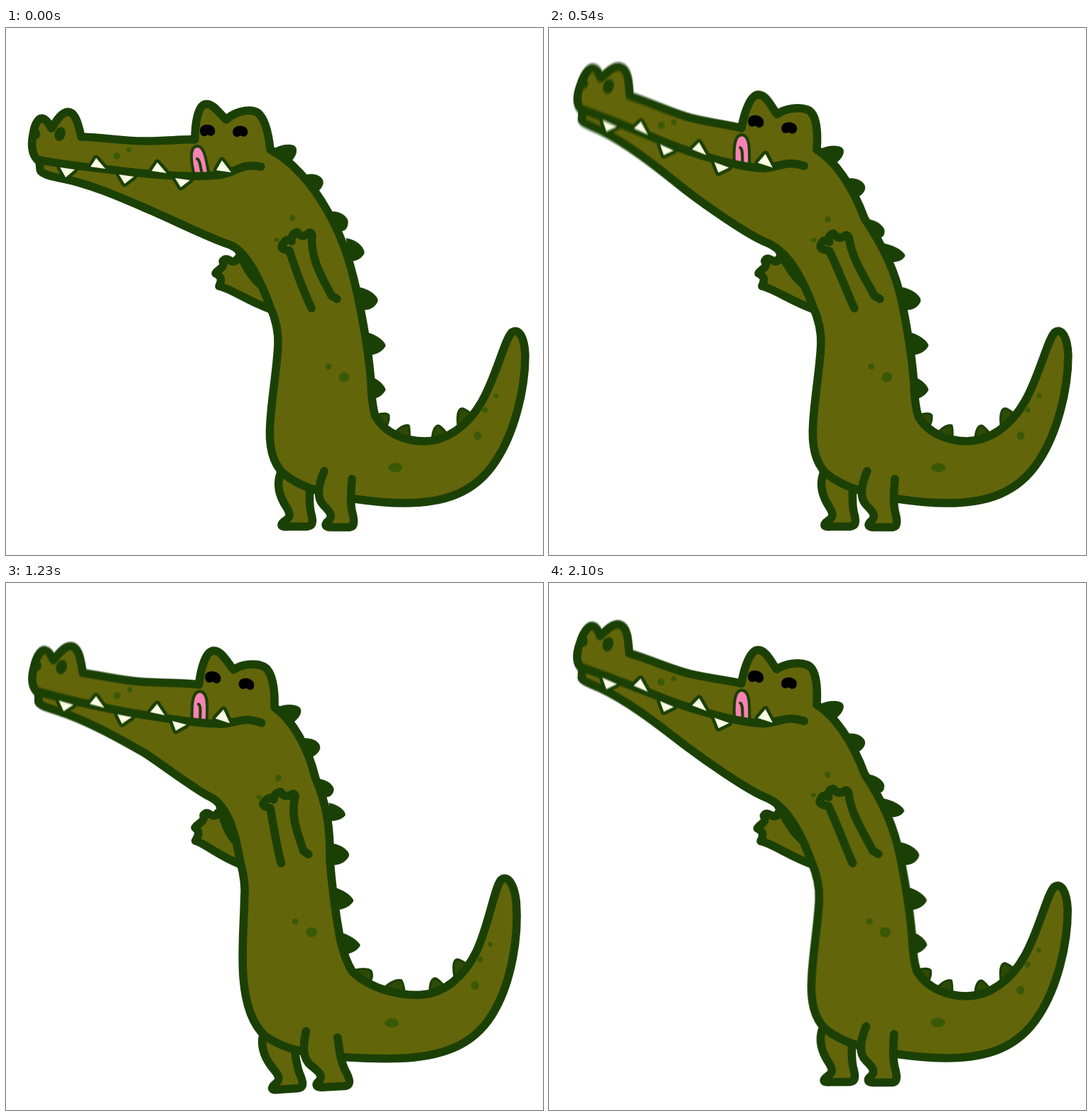
An HTML page with a canvas for the animation above (2.13 s loop, 756x741 px).

```html
<!DOCTYPE html>
<html lang="en">
<head>
<meta charset="utf-8">
<title>Dancing crocodile</title>
<style>
html, body { margin: 0; width: 100%; height: 100%; overflow: hidden; background: #fff; }
canvas { display: block; }
</style>
</head>
<body>
<canvas id="stage" width="756" height="741"></canvas>
<script>
const W = 756, H = 741, STEP = 30, FRAMES = 71, SAMPLES = 12, SHUTTER = 0.5, CYCLE = 16.8;
const OLIVE = '#63650a', DARK = '#1b4005', SPOT = '#3a5907', CREAM = '#fbfde4', PINK = '#f882b4';

const clamp = v => Math.min(1, Math.max(0, v));
function smooth(a, b, v) {
  const t = clamp((v - a) / (b - a));
  return t * t * (3 - 2 * t);
}

// Full sway: the belly swings left, the head tips forward, the tail turns about its root
function swayShift(x, y) {
  const tail = smooth(500, 615, x + 0.3 * (y - 500));
  const offNose = smooth(120, 340, x);
  const belly = -48 * Math.exp(-(((y - 450) / (y < 450 ? 170 : 220)) ** 2));
  const head = 7 * (1 - smooth(170, 260, y));
  const tip = 0.12 * (x - 340) * (1 - smooth(220, 400, y));
  const root = Math.max(tail, smooth(540, 640, y));
  return [
    (belly + head) * offNose * (1 - tail) - 0.08 * (620 - y) * tail,
    tip * offNose * (1 - tail) - 0.07 * (x - 560) * root
  ];
}

// Full nod: the head bends upwards, more and more towards the nose
function nodShift(x, y) {
  const reach = Math.min(1.04, (375 - x) / 300);
  const hold = 1 - smooth(250, 340, y);
  return [
    0.15 * (150 + 0.13 * x - y) * hold,
    -56 * Math.sign(reach) * Math.abs(reach) ** 1.4 * hold
  ];
}

function point(x, y) {
  const [sx, sy] = swayShift(x, y), [nx, ny] = nodShift(x, y);
  const arc = 4 * smooth(230, 110, x);
  return (sway, nod) => [
    x + sway * sx + nod * nx + nod * nod * arc,
    y + sway * sy + nod * ny
  ];
}

// Path text becomes a function that gives the bent path
function bend(d) {
  const parts = d.split(/(-?[\d.]+,-?[\d.]+)/)
    .map(s => s.includes(',') ? point(...s.split(',').map(Number)) : s);
  return (sway, nod) => new Path2D(parts.map(
    p => typeof p === 'string' ? p : p(sway, nod).map(v => v.toFixed(2)).join()).join(''));
}

const shapes = [];
const shape = (d, fill, stroke, width = 11.5) => shapes.push({ path: bend(d), fill, stroke, width });
const oval = (x, y, rx, ry, fill, turn = 0) => shapes.push({ at: point(x, y), rx, ry, fill, turn });

// Back and tail spikes
[
  'M372,174 C382,165 398,162 406,166 C413,172 405,186 397,191',
  'M418,208 C434,202 448,209 446,219 C444,228 437,231 430,231',
  'M455,259 C470,256 483,266 481,275 C480,284 475,287 466,284',
  'M479,296 C494,298 505,309 504,317 C500,325 491,328 482,328',
  'M498,365 C512,368 524,377 523,384 C520,393 511,397 500,396',
  'M507,428 C521,431 534,441 534,447 C530,455 521,459 509,460',
  'M511,490 C523,493 533,502 534,509 C530,517 522,521 512,522'
].forEach(d => shape(d, DARK, DARK, 1));
[
  'M517,546 C528,541 537,541 539,545 C540,554 535,562 529,567',
  'M545,573 C552,562 562,557 567,559 C569,565 568,575 568,581',
  'M600,580 C600,566 605,556 611,560 C617,565 621,570 623,576',
  'M637,564 C634,546 636,534 643,535 C650,538 655,542 657,547'
].forEach(d => shape(d, '#2f4a06', DARK, 3));

// Far arm and far leg
shape('M345,340 C337,326 330,316 324,327 C317,333 312,319 305,328 C309,338 299,338 295,345 C304,350 304,354 300,363 C318,367 340,384 374,396', OLIVE, DARK);
shape('M386,627 C380,645 387,662 395,674 C401,684 400,688 394,692 C385,698 386,702 396,701 L424,701 C434,700 432,691 429,680 C427,670 427,660 428,643', OLIVE, DARK);

// Body with head and tail
shape('M437,650 C420,645 402,636 390,626 C372,608 370,580 372,555 C374,520 382,475 383,445 C384,425 379,408 372,392 C362,365 348,332 329,314 Q322,307 313,304 C290,297 235,270 205,257 C170,242 120,219 76,211 C60,208 47,204 48,198 L47,188 C34,178 36,160 38,150 C40,135 46,126 51,127 C58,128 62,138 64,141 C70,132 78,118 87,118 C98,118 102,136 106,153 C140,154 165,159 195,159 C225,159 250,156 266,157 C266,135 270,107 282,107 C292,106 302,122 310,129 C320,119 338,114 350,117 C364,121 370,150 372,171 C400,185 430,217 453,258 C476,298 488,340 498,390 C506,430 512,470 514,500 Q515,530 520,546 C535,572 565,581 588,581 C620,581 650,560 670,525 C690,490 702,438 712,428 C722,421 730,435 731,460 C731,510 715,570 690,608 C660,655 615,668 560,668 C530,668 510,665 490,662', OLIVE, DARK);
shape('M327,314 C336,335 344,350 358,362', null, DARK, 10);

// Near leg and near arm
shape('M448,623 C440,642 436,660 447,671 C457,681 460,686 455,692 C447,698 449,702 458,702 L484,702 C492,701 490,690 487,679 C484,664 486,650 487,634', OLIVE, DARK);
shape('M430,394 C419,370 406,335 399,313 Q385,311 389,305 Q395,294 402,300 Q401,290 410,287 Q416,296 424,290 Q429,285 431,291 C428,325 446,352 458,376 L466,381', null, DARK);

// Skin spots and nostrils
oval(156, 180, 5, 4.5, SPOT);
oval(173, 171, 3.5, 3.5, SPOT);
oval(403, 267, 4, 4.5, SPOT);
oval(381, 298, 3.5, 3, SPOT);
oval(454, 476, 4.2, 4.2, SPOT);
oval(476, 491, 7.5, 7, SPOT);
oval(548, 618, 10, 6.5, SPOT);
oval(664, 573, 5.5, 6, SPOT);
oval(674, 537, 4, 4, SPOT);
oval(690, 517, 3.2, 3.2, SPOT);
oval(76, 149, 7.5, 10, DARK, 0.3);
oval(43, 149, 5, 7, DARK);

// Eyes
[
  'M274,149 C267,132 298,131 294,148 C291,153 287,152 284,150 C281,153 276,153 274,149Z',
  'M320,150 C314,134 344,133 340,149 C337,154 333,153 330,151 C327,154 322,154 320,150Z'
].forEach(d => shape(d, '#000'));

// Tongue and mouth
shape('M265,207 C261,190 257,167 269,166 C281,166 282,190 286,207', PINK, DARK, 4);
shape('M276,206 C274,196 273,185 269,184', null, DARK, 4);
shape('M45,185 C75,192 130,197 170,202 C215,207 270,211 305,206 C327,201 332,190 359,195', null, DARK);

// Teeth: middle of the base and height, downwards positive
function tooth(x, y, h) {
  const d = `M${x - 10},${y - 1} L${x + 11},${y + 2} L${x - 2},${y + h}Z`;
  shape(d, DARK, DARK, 9);
  return d;
}
[
  tooth(86, 197, 13), tooth(129, 196, -13), tooth(169, 207, 12),
  tooth(215, 202, -13), tooth(248, 212, 12), tooth(306, 201, -15)
].forEach(d => shape(d, CREAM));

// Key points of one nod: phase and amount
const nodKeys = [
  [0, .95], [1.6, 1.28], [8.15, .46], [8.45, 0], [8.9, 0],
  [11.4, -1.36], [12.9, -1.1], [13.9, .7], [CYCLE, .95]
];
function nodAt(t) {
  const p = t % CYCLE;
  const i = nodKeys.findIndex(k => k[0] > p);
  const [p0, a] = nodKeys[i - 1], [p1, b] = nodKeys[i];
  const start = clamp((t - 0.3) / 1.5);
  return (a + (b - a) * (p - p0) / (p1 - p0)) * start;
}
const sigmoid = v => 1 / (1 + Math.exp(-1.6 * v));
const swayAt = t => sigmoid(t % CYCLE - 4.55) - sigmoid(t % CYCLE - 12.95);

const ctx = document.getElementById('stage').getContext('2d');
const layer = document.createElement('canvas');
layer.width = W;
layer.height = H;
const pen = layer.getContext('2d');
pen.lineCap = pen.lineJoin = 'round';

function drawPose(t) {
  const sway = swayAt(t), nod = nodAt(t);
  pen.fillStyle = '#fff';
  pen.fillRect(0, 0, W, H);
  for (const s of shapes) {
    let path;
    if (s.path) path = s.path(sway, nod);
    else {
      path = new Path2D();
      path.ellipse(...s.at(sway, nod), s.rx, s.ry, s.turn, 0, 7);
    }
    if (s.fill) {
      pen.fillStyle = s.fill;
      pen.fill(path);
    }
    if (s.stroke) {
      pen.strokeStyle = s.stroke;
      pen.lineWidth = s.width;
      pen.stroke(path);
    }
  }
}

// Motion blur: running average of poses while the shutter is open
function drawFrame(frame) {
  for (let k = 0; k < SAMPLES; k++) {
    drawPose(Math.max(0, frame + ((k + 0.5) / SAMPLES - 0.5) * SHUTTER));
    ctx.globalAlpha = 1 / (k + 1);
    ctx.drawImage(layer, 0, 0);
  }
}

const start = performance.now();
let shown = -1;
function tick() {
  const frame = Math.floor((performance.now() - start) / STEP) % FRAMES;
  if (frame !== shown) drawFrame(shown = frame);
  requestAnimationFrame(tick);
}
tick();
</script>
</body>
</html>
```
